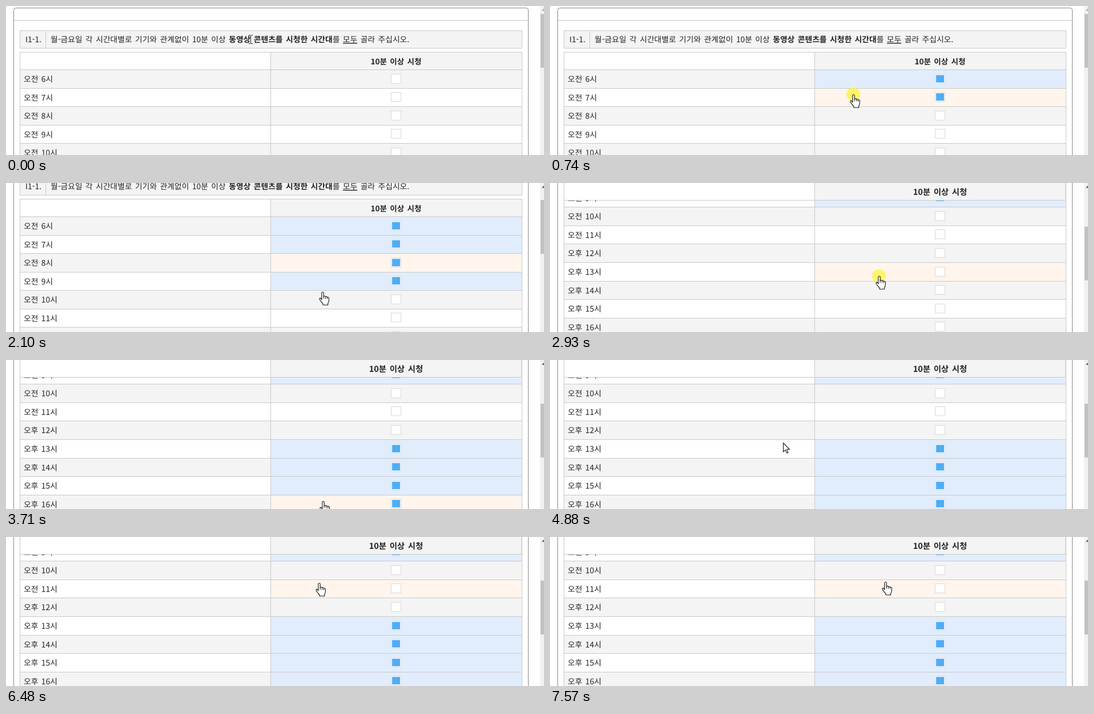
Animation, 942 px wide and 263 px high, one loop 7.64 s. Source, as an HTML page:

```html
<!DOCTYPE html>
<html lang="ko">
<head>
<meta charset="utf-8">
<title>시청 시간대</title>
<style>
  html, body { margin: 0; width: 100%; height: 100%; overflow: hidden; background: #fff; }
  svg { display: block; width: 942px; height: 263px; }
  rect { shape-rendering: crispEdges; }
  text { font: 13.8px "Noto Sans CJK KR", "Noto Sans CJK", sans-serif; word-spacing: 1.6px;
    text-rendering: geometricPrecision; fill: #222; white-space: pre; }
  .b { font-weight: 700; }
  .mid { text-anchor: middle; }
  .ink { fill: #fff; stroke: #111; stroke-width: 1.1; stroke-linejoin: round; }
</style>
</head>
<body>
<svg id="stage" viewBox="0 0 942 263"></svg>
<script>
const LOOP = 7640, TICK = 70, TOP = 112, PITCH = 32.58, ROWS = 14, SPLIT = 463;
const SCROLL_START = 2030, SCROLL_END = 200, FIRST_PRESS = 600;
const GRAY = '#f4f4f4', LINE = '#c9c9c9', HOVER = '#fff5ec', PICKED = '#e1edfc';

const stage = document.getElementById('stage');

function add(parent, tag, attrs = {}, text) {
  const el = document.createElementNS('http://www.w3.org/2000/svg', tag);
  for (const k in attrs) el.setAttribute(k, attrs[k]);
  if (text) el.textContent = text;
  parent.appendChild(el);
  return el;
}
const box = (p, x, y, width, height, fill) => add(p, 'rect', { x, y, width, height, fill });
const move = (el, x, y) => el.setAttribute('transform', `translate(${x} ${y})`);
const show = (el, on) => el.setAttribute('visibility', on ? 'visible' : 'hidden');

// Page frame and question
const page = add(stage, 'g');
add(page, 'rect', { x: 13.5, y: 3.5, width: 901, height: 700, rx: 4, fill: '#fff', stroke: '#858585',
  style: 'shape-rendering:auto' });
box(page, 14, 25, 900, 1, LINE);
box(page, 24, 43, 880, 32, LINE);
box(page, 25, 44, 878, 30, GRAY);
box(page, 69, 43, 1, 32, LINE);
add(page, 'text', { x: 34, y: 64 }, 'I1-1.');
const question = add(page, 'text', { x: 78, y: 64 });
add(question, 'tspan', {}, '월-금요일 각 시간대별로 기기와 관계없이 10분 이상 ');
add(question, 'tspan', { class: 'b' }, '동영상 콘텐츠를 시청한 시간대');
add(question, 'tspan', {}, '를 ');
add(question, 'tspan', { 'text-decoration': 'underline' }, '모두');
add(question, 'tspan', {}, ' 골라 주십시오.');

function header(parent, y, size) {
  const g = add(parent, 'g');
  box(g, 24, y, 880, 32, LINE);
  box(g, 25, y + 1, 438, 30, '#fff');
  box(g, 464, y + 1, 439, 30, GRAY);
  add(g, 'text', { x: 683, y: y + 22, class: 'b mid', style: `font-size:${size}px` }, '10분 이상 시청');
  return g;
}
header(page, 81, 13.5);

// Table rows
const rows = Array.from({ length: ROWS }, (_, i) => {
  const g = add(stage, 'g'), hour = 6 + i, base = i % 2 ? '#fff' : GRAY;
  box(g, 24, 0, 880, 34, base);
  const cell = box(g, 464, 0, 439, 34, base);
  box(g, 24, 0, 880, 1, LINE);
  for (const x of [24, SPLIT, 903]) box(g, x, 0, 1, 34, LINE);
  add(g, 'text', { x: 31, y: 22 }, `${hour < 12 ? '오전' : '오후'} ${hour}시`);
  const check = add(g, 'g');
  box(check, 674, 0, 18, 17, '#d9d9d9');
  box(check, 675, 1, 16, 15, '#fff');
  const tick = box(check, 676, 2, 14, 13, '#50adf3');
  return { g, cell, check, tick, base };
});

const sticky = header(stage, -1, 14.4);
box(sticky, 902, 0, 1, 30, '#d8d8d8');

// Scrollbar
box(stage, 935, 0, 7, 263, '#f1f1f1');
const thumb = box(stage, 936, 14, 6, 95, '#c1c1c1');
const up = add(stage, 'path', { d: 'M938 8.5L942 4.5L946 8.5Z' });

// Pointer
const glow = add(stage, 'circle', { r: 12, fill: '#fff44d', 'fill-opacity': .82 });
const pointer = add(stage, 'g');
const shapes = {
  hand: add(pointer, 'g'),
  arrow: add(pointer, 'path', { class: 'ink', d: 'M.5 .5V16.2L4.1 12.8L6.6 18.4L9 17.4L6.6 11.8H11.6Z' }),
  beam: add(pointer, 'path', { d: 'M-3 -7.5H-1L.5 -6.5L2 -7.5H4M.5 -6.5V6.5M-3 7.5H-1L.5 6.5L2 7.5H4',
    fill: 'none', stroke: '#222' })
};
add(shapes.hand, 'path', { class: 'ink',
  d: 'M-1.2 14V2.2A1.7 1.7 0 0 1 2.2 2.2V8.4Q2.6 7.3 3.9 7.5Q5.2 7.7 5.4 9Q5.9 8 7 8.3Q8.2 8.6 8.4 9.9' +
     'Q9 9.2 10 9.6Q11.3 10 11.3 11.6V15.5Q11.3 18 9.6 20.4V23.2H.9V21Q-2.6 17.6-4.9 13.4Q-5.6 11.6-4 11.1Q-2.6 11-1.2 14Z' });
add(shapes.hand, 'path', { d: 'M2.2 8V12M5.4 9V12.4M8.4 10V12.8', fill: 'none', stroke: '#111' });

function progress(t, start, end) {
  if (t >= end) return 1;
  const n = Math.round((end - start) / TICK);
  return (Math.floor((t - start) / (end - start) * n + .1) + 1) / (n + 1);
}

// A chain of moves; each runs from the previous goal, power > 1 starts slowly
function track(...origin) {
  const legs = [{ start: 0, end: 0, from: origin, goal: origin, power: 1 }];
  return {
    to(start, end, goal, power = 1) {
      legs.push({ start, end, from: legs.at(-1).goal, goal, power });
      return this;
    },
    jump(time, ...goal) { return this.to(time, time, goal); },
    at(t) {
      const { start, end, from, goal, power } = legs.findLast(leg => t >= leg.start);
      const p = progress(t, start, end) ** power;
      return from.map((v, i) => Math.round(v + (goal[i] - v) * p));
    }
  };
}

const hand = track(428, 59)
  .to(70, 340, [529, 133])
  .to(FIRST_PRESS, 1290, [536, 219])
  .to(1420, 1770, [554, 192], 2)
  .to(2520, 2730, [576, 164])
  .to(2930, 3630, [574, 247], 3)
  .to(3710, 4270, [406, 264])
  .jump(4600, 422, 264)
  .to(4600, 4880, [408, 146])
  .to(4950, 5300, [291, 94])
  .to(5440, 5850, [577, 104])
  .to(5920, 6130, [323, 92], 3)
  .to(6200, 6550, [593, 79])
  .jump(6750, 587, 79)
  .to(7230, 7370, [590, 86])
  .jump(7570, 587, 79);

const scroll = track(0).to(SCROLL_START, 2380, [SCROLL_END], 1.21);

const presses = [[FIRST_PRESS, 1420], [2930, 3710], [5370, 6200]];

function rowAt(t) {
  const [x, y] = hand.at(t);
  return x > SPLIT && y < 263 ? Math.floor((y + scroll.at(t)[0] - TOP) / PITCH) : -1;
}

// Hover stays with its row while the page scrolls
function hoverAt(t) {
  if (t < FIRST_PRESS) return -1;
  const [s] = scroll.at(t);
  return rowAt(s > 0 && s < SCROLL_END ? SCROLL_START - 1 : t);
}

// A drag that begins on a cell fills every row down to the pointer
const picked = (r, t) => presses.some(([start, end]) => {
  const first = rowAt(start);
  return t >= start + TICK && first >= 0 && r >= first && r <= rowAt(Math.min(t, end - 1));
});

function render(t) {
  const [s] = scroll.at(t), [x, y] = hand.at(t), hover = hoverAt(t);
  move(page, 0, -s);
  rows.forEach((row, i) => {
    const on = picked(i, t), top = TOP + PITCH * i - s, line = Math.round(top);
    move(row.g, 0, line);
    move(row.check, 0, Math.round(top + 7.5) - line);
    row.cell.setAttribute('fill', i === hover ? HOVER : on ? PICKED : row.base);
    show(row.tick, on);
  });
  show(sticky, s > 82);
  thumb.setAttribute('y', Math.floor(14 + s * .315));
  up.setAttribute('fill', s ? '#505050' : '#a8a8a8');

  const kind = s === 0 && y < 75 ? 'beam' : x > SPLIT && y + s > TOP ? 'hand' : 'arrow';
  for (const k in shapes) shapes[k].setAttribute('display', k === kind ? 'inline' : 'none');
  move(pointer, x, y);
  move(glow, x, y);
  show(glow, presses.some(([start, end]) => t >= start && t < end));
}

const began = performance.now();
function frame() {
  render((performance.now() - began) % LOOP);
  requestAnimationFrame(frame);
}
frame();
</script>
</body>
</html>
```
